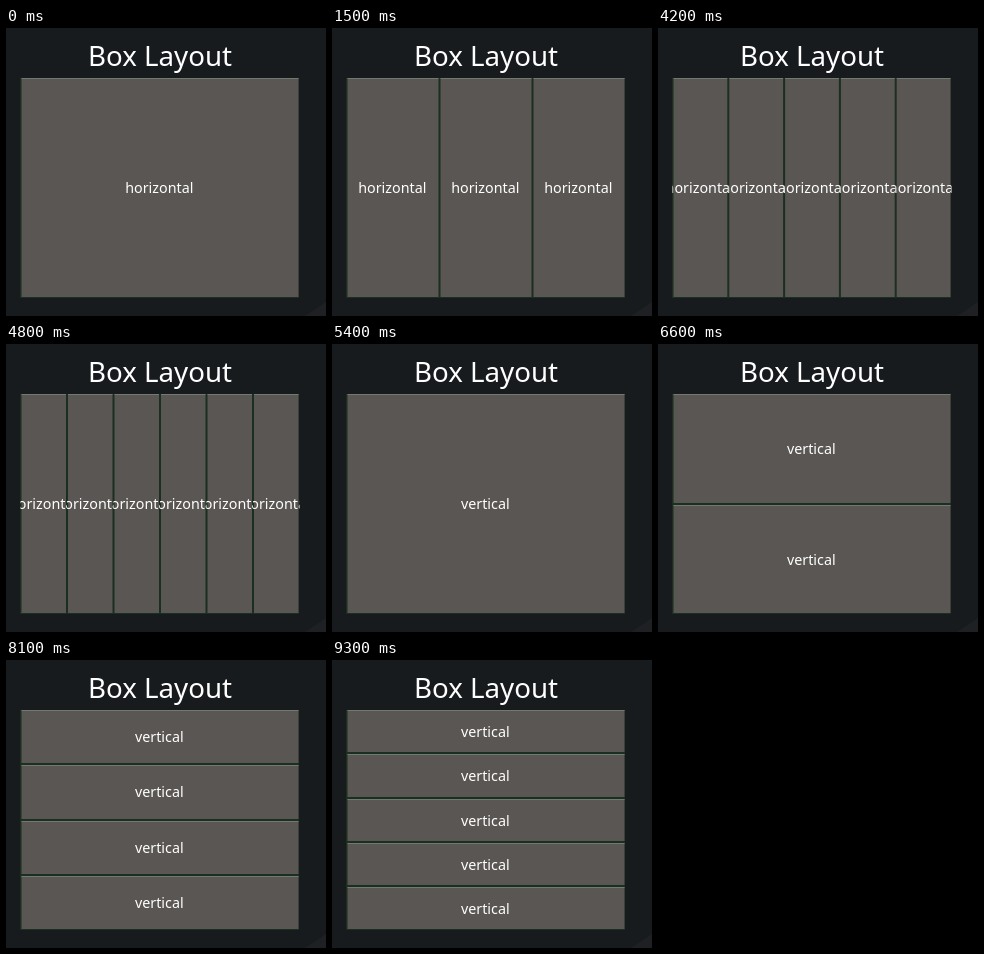
Recreate the animation shown at these times as an HTML page with a canvas. Size 320x288 px, loop 9900 ms.

```html
<!DOCTYPE html>
<html lang="en">
<head>
<meta charset="utf-8">
<title>Box Layout</title>
<style>
html, body { margin: 0; height: 100%; overflow: hidden; background: #171b1e; }
canvas { display: block; }
</style>
</head>
<body>
<canvas id="stage" width="320" height="288"></canvas>
<script>
const ctx = document.getElementById('stage').getContext('2d');
const LOOP = 9900;
const GAP = 2;
const BOX = { x: 15.5, y: 50, w: 279, h: 221.4 }; // includes one trailing gap
const FONT = '"Noto Sans", "Open Sans", sans-serif';

// Start time, orientation, number of buttons
const STEPS = [
  [0, 'horizontal', 1], [300, 'horizontal', 2], [1200, 'horizontal', 3],
  [2700, 'horizontal', 4], [3600, 'horizontal', 5], [4500, 'horizontal', 6],
  [5400, 'vertical', 1], [6000, 'vertical', 2], [6900, 'vertical', 3],
  [7500, 'vertical', 4], [8700, 'vertical', 5]
];

function rect(color, x, y, w, h) {
  ctx.fillStyle = color;
  ctx.fillRect(x, y, w, h);
}

function text(str, size, x, y) {
  ctx.font = `${size}px ${FONT}`;
  ctx.fillStyle = '#fff';
  ctx.fillText(str, x, y);
}

function button(label, x, y, w, h) {
  const top = Math.round(y), bottom = Math.round(y + h);
  rect('#5a5653', x, top, w, bottom - top);
  rect('#707a71', x, top, w, 1);
  ctx.save();
  ctx.beginPath();
  ctx.rect(x - GAP / 2, top, w + GAP, h);
  ctx.clip();
  text(label, 14.3, x + w / 2 - 0.7, Math.round(top + h / 2 + 5.7));
  ctx.restore();
}

function draw(time) {
  const [, label, count] = STEPS.findLast(step => step[0] <= time);
  const across = label === 'horizontal';
  const w = across ? BOX.w / count : BOX.w;
  const h = across ? BOX.h : BOX.h / count;

  rect('#171b1e', 0, 0, 320, 288);
  ctx.fillStyle = '#1e2023';
  ctx.beginPath();
  ctx.moveTo(320, 274);
  ctx.lineTo(320, 288);
  ctx.lineTo(299, 288);
  ctx.fill();

  ctx.textAlign = 'center';
  text('Box Layout', 27.7, 154, 38);
  rect('#1a2f1f', BOX.x - 1.5, BOX.y, BOX.w, 220);
  for (let i = 0; i < count; i++) {
    const x = BOX.x + (across ? i * w : 0);
    const y = BOX.y + (across ? 0 : i * h);
    button(label, x, y, w - GAP, h - GAP);
  }
}

function tick() {
  draw(performance.now() % LOOP);
  requestAnimationFrame(tick);
}
tick();
</script>
</body>
</html>
```
